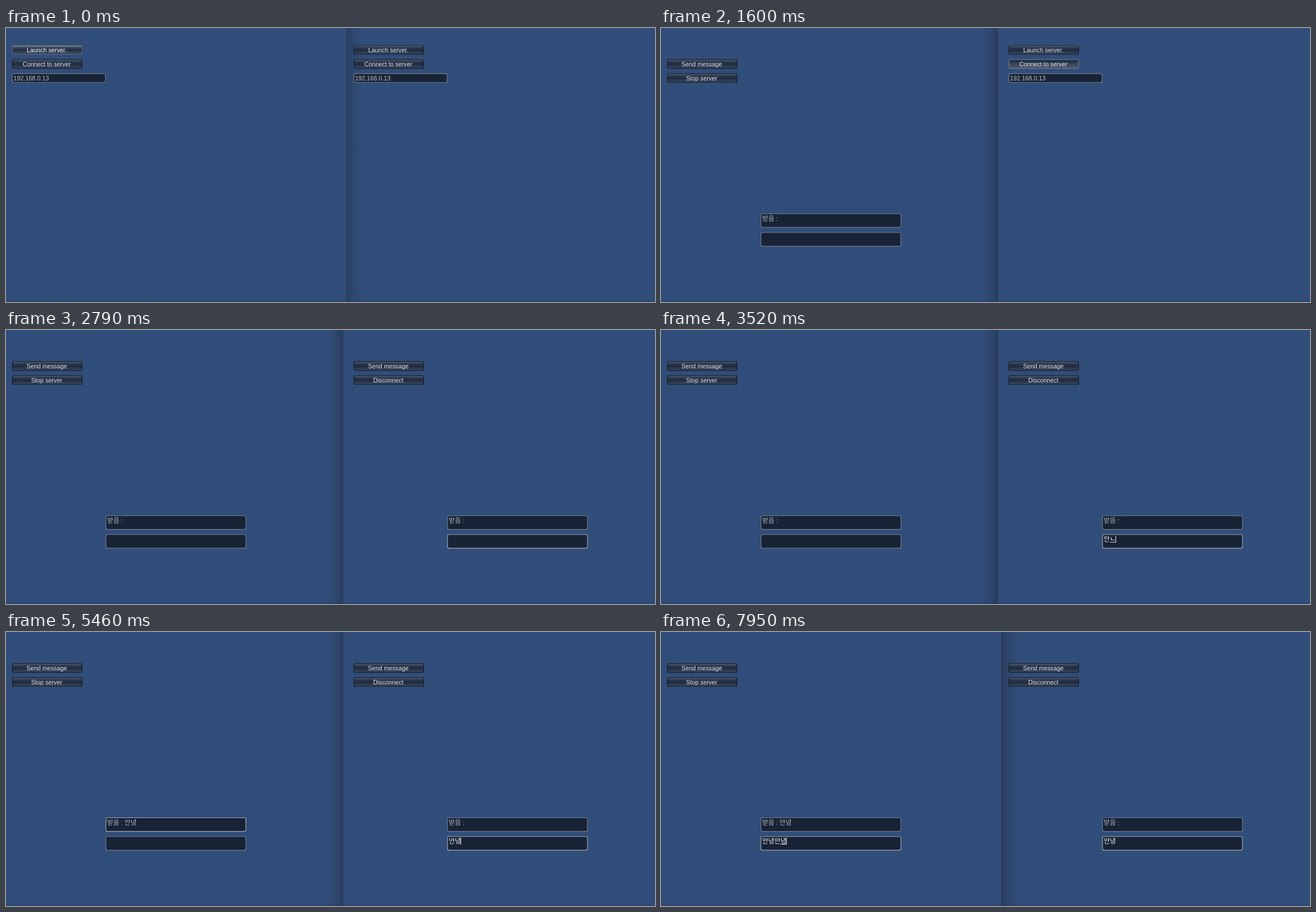
An HTML page with a canvas for the animation above (8000 ms loop, 1151 by 486 pixels).

```html
<!DOCTYPE html>
<html lang="ko">
<head>
<meta charset="utf-8">
<style>
  html, body { margin: 0; width: 100%; height: 100%; overflow: hidden; background: #314d79; }
  canvas { display: block; }
</style>
</head>
<body>
<canvas id="stage" width="1151" height="486"></canvas>
<script>
const ctx = document.getElementById('stage').getContext('2d');
const W = 1151, H = 486, LOOP = 8000;
const LEFT = 0, RIGHT = 605.8;
const LATIN = '10.8px "Liberation Sans", Arial, sans-serif';
const HANGUL = '11.7px "Noto Sans CJK KR", "Noto Sans CJK", sans-serif';
const SYLLABLES = ['', 'ㅇ', '아', '안', '안ㄴ', '안녀', '안녕'];

const BUTTON_LOOKS = {
  normal: { border: '#0c121d', stops: ['#566070', '#2f3b50', '#1d2a40', '#3a465b'], text: '#e4e6e9' },
  hover: { border: '#69717f', stops: ['#7a828e', '#38455a', '#212e44', '#434f63'], text: '#ffffff' },
  active: { border: '#7d8591', stops: ['#1d2a40', '#243148', '#38455a', '#4d586b'], text: '#e4e6e9' }
};

const within = (t, from, to) => t >= from && t < to;
const rowY = row => 30.7 + 24.9 * row;
const every = (start, step) => SYLLABLES.slice(1).map((_, i) => start + i * step);
const typed = (t, times) => SYLLABLES[times.filter(time => t >= time).length];

function panel(x, y, w, h, radius, fill) {
  ctx.fillStyle = fill;
  ctx.beginPath();
  ctx.roundRect(x, y, w, h, radius);
  ctx.fill();
}

function button(x, row, label, look = 'normal') {
  const { border, stops, text } = BUTTON_LOOKS[look];
  const y = rowY(row), w = 124.5, h = 16.6;
  const shade = ctx.createLinearGradient(0, y + 1, 0, y + h - 1);
  [0, 0.2, 0.5, 1].forEach((at, i) => shade.addColorStop(at, stops[i]));
  panel(x + 10.8, y, w, h, 3.2, border);
  panel(x + 11.7, y + 0.9, w - 1.8, h - 1.8, 2.4, shade);

  ctx.save();
  ctx.beginPath();
  ctx.rect(x + 10.8, y, w, 14.6);
  ctx.clip();
  ctx.font = LATIN;
  ctx.fillStyle = text;
  ctx.textAlign = 'center';
  ctx.fillText(label, x + 72.2, y + 12.7);
  ctx.restore();
}

// Draws Latin and Hangul in their own fonts; returns the left edge of each character and the end.
function mixedText(text, x, y, color) {
  const edges = [x];
  ctx.fillStyle = color;
  for (const char of text) {
    ctx.font = char > '\u3000' ? HANGUL : LATIN;
    ctx.fillText(char, x, y);
    x += ctx.measureText(char).width;
    edges.push(x);
  }
  return edges;
}

function field(x, y, w, h, bright) {
  panel(x, y, w, h, 3.2, bright ? '#c3c8cf' : '#858e9c');
  panel(x + 0.9, y + 0.9, w - 1.8, h - 1.8, 2.4, '#182336');
}

function menu(x, launch, connect) {
  button(x, 0, 'Launch server.', launch);
  button(x, 1, 'Connect to server', connect);
  field(x + 10.8, rowY(2), 166, 16.6);
  mixedText('192.168.0.13', x + 13.2, rowY(2) + 12.7, '#c0c5cc');
}

function chat(x, o) {
  button(x, 1, 'Send message', o.send);
  button(x, 2, o.leave);
  field(x + 176.8, 329.2, 249, 25, o.receivedBright);
  mixedText('받음 : ' + o.received, x + 179.5, 341.8, '#b4b9c0');
  field(x + 176.8, 362.4, 249, 25, o.inputBright);
  const edges = mixedText(o.input, x + 179.5, 374.9, '#f4f5f6');
  const end = edges[edges.length - 1];
  ctx.fillStyle = '#f4f5f6';
  if (o.composing && o.input) {
    const start = edges[edges.length - 2];
    ctx.fillRect(start, 376, end - start, 0.9);
  }
  if (o.caret) ctx.fillRect(Math.floor(end), 365, 1, 12);
}

function shadow(from, to, alpha) {
  const fade = ctx.createLinearGradient(from, 0, to, 0);
  fade.addColorStop(0, `rgba(31,42,58,${alpha})`);
  fade.addColorStop(0.4, `rgba(31,42,58,${alpha * 0.45})`);
  fade.addColorStop(1, 'rgba(31,42,58,0)');
  ctx.fillStyle = fade;
  ctx.fillRect(Math.min(from, to), 0, Math.abs(to - from), H);
}

function backdrop(t) {
  ctx.fillStyle = '#314d79';
  ctx.fillRect(0, 0, W, H);
  ctx.fillStyle = 'rgba(25,40,80,.16)';
  ctx.fillRect(0, 483, W, 3);
  const rightOnTop = within(t, 1600, 5880);
  if (rightOnTop) shadow(599, 569, 0.5);
  else shadow(602, 634, t < 400 ? 0.38 : 0.5);
  ctx.fillStyle = rightOnTop ? '#3d557d' : '#44587c';
  ctx.fillRect(rightOnTop ? 598.5 : 601.5, 0, 1, H);
}

function leftSide(t) {
  if (t < 400) return menu(LEFT, within(t, 70, 200) ? 'active' : 'hover');
  chat(LEFT, {
    leave: 'Stop server',
    received: t >= 4920 ? '안녕' : '',
    receivedBright: within(t, 5460, 5530),
    input: typed(t, every(6750, 106)) + typed(t, [7480, 7570, 7660, 7750, 7890, 7950]),
    inputBright: within(t, 2260, 2790) || t >= 5530,
    composing: true,
    caret: t >= 5880
  });
}

function rightSide(t) {
  if (t < 1730) {
    return menu(RIGHT, 'normal', t >= 1600 ? 'active' : t >= 1340 ? 'hover' : 'normal');
  }
  const overSend = within(t, 1730, 1800) || within(t, 4580, 5260);
  chat(RIGHT, {
    send: within(t, 4850, 4920) ? 'active' : overSend ? 'hover' : 'normal',
    leave: 'Disconnect',
    received: '',
    input: typed(t, every(3170, 110)),
    inputBright: t >= 2790,
    composing: t < 4580,
    caret: within(t, 3060, 4650) || within(t, 4990, 5880) || within(t, 6680, 7480)
  });
}

function draw() {
  const t = performance.now() % LOOP;
  backdrop(t);
  leftSide(t);
  rightSide(t);
  requestAnimationFrame(draw);
}
draw();
</script>
</body>
</html>
```
